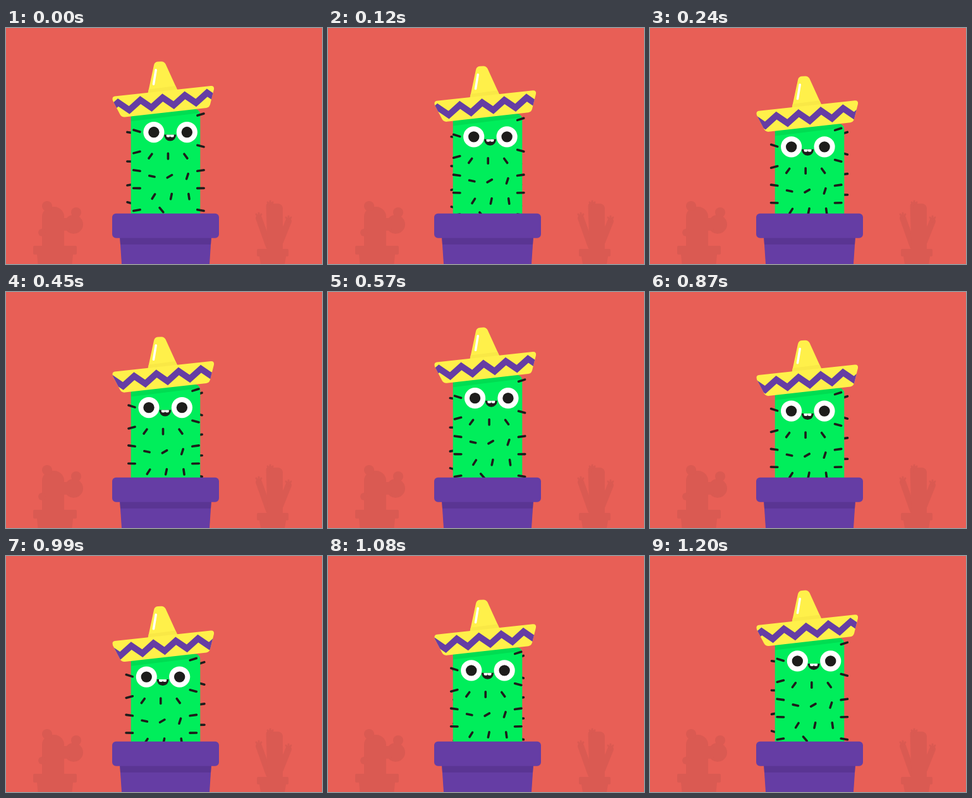
Animation, 500 px wide and 375 px high, one loop 1230 ms. Source, as an HTML page with a canvas:

```html
<!DOCTYPE html>
<html lang="en">
<head>
<meta charset="utf-8">
<title>Dancing cactus</title>
<style>
html, body { margin: 0; width: 100%; height: 100%; overflow: hidden; background: #e85f56; }
canvas { display: block; }
</style>
</head>
<body>
<canvas id="stage" width="500" height="375"></canvas>
<script>
const ctx = document.getElementById('stage').getContext('2d');
const LOOP = 1230;
const DROP = 28;
const TURNS = [15, 322, 642, 950, 1245]; // alternating top and bottom of the bounce
const RED = '#e85f56', SHADE = '#da5a52', PURPLE = '#653da4', PLUM = '#5a3593';
const GREEN = '#00ee5b', LEAF = '#00dd52', YELLOW = '#fff04a', GOLD = '#f9e846';
const INK = '#1d1d1b', WHITE = '#ffffff';

function fill(color, path) {
  ctx.fillStyle = color;
  ctx.beginPath();
  path();
  ctx.fill();
}
const circle = (x, y, r, color) => fill(color, () => ctx.arc(x, y, r, 0, Math.PI * 2));
const box = (x, y, w, h, r, color) => fill(color, () => ctx.roundRect(x, y, w, h, r));

// Upright trapezoid centred on x
const taper = (x, top, bottom, topWidth, bottomWidth, color) => fill(color, () => {
  ctx.moveTo(x - topWidth / 2, top);
  ctx.lineTo(x + topWidth / 2, top);
  ctx.lineTo(x + bottomWidth / 2, bottom);
  ctx.lineTo(x - bottomWidth / 2, bottom);
});

// Slanted strip from (x1, y1) to (x2, y2), reaching down by depth
const strip = (x1, y1, x2, y2, depth, color) => fill(color, () => {
  ctx.moveTo(x1, y1);
  ctx.lineTo(x2, y2);
  ctx.lineTo(x2, y2 + depth);
  ctx.lineTo(x1, y1 + depth);
});

function line(x1, y1, x2, y2, width, color) {
  ctx.strokeStyle = color;
  ctx.lineWidth = width;
  ctx.lineCap = 'round';
  ctx.beginPath();
  ctx.moveTo(x1, y1);
  ctx.lineTo(x2, y2);
  ctx.stroke();
}

function shifted(dx, dy, draw) {
  ctx.save();
  ctx.translate(dx, dy);
  draw();
  ctx.restore();
}

function clipped(path, draw) {
  ctx.save();
  ctx.clip(path);
  draw();
  ctx.restore();
}

function bounce(time) {
  const t = time < TURNS[0] ? time + LOOP : time;
  const i = TURNS.findIndex((turn, k) => t < TURNS[k + 1]);
  const u = (t - TURNS[i]) / (TURNS[i + 1] - TURNS[i]);
  const eased = (1 - Math.cos(Math.PI * u)) / 2;
  return DROP * (i % 2 ? 1 - eased : eased);
}

function finger(x, y, footX, width) {
  line(x, y + 4, footX, 347, width, SHADE);
  for (const side of [-1, 0, 1]) line(x + side * 4, y - 4 + 2 * Math.abs(side), x, y + 4, 3, SHADE);
}

function backdrop() {
  ctx.fillStyle = RED;
  ctx.fillRect(0, 0, 500, 375);

  box(57, 284, 35, 66, [16, 16, 0, 0], SHADE);
  circle(65, 283, 8, SHADE);
  circle(57, 325, 6, SHADE);
  circle(107, 312, 15, SHADE);
  circle(111, 293, 8, SHADE);
  box(85, 302, 16, 20, 4, SHADE);
  box(43, 346, 69, 14, 2, SHADE);
  taper(77.5, 360, 375, 57, 54, SHADE);

  finger(400, 298, 416, 10);
  finger(418, 279, 420, 13);
  finger(447, 303, 431, 10);
  box(416, 279, 22, 72, [8, 8, 0, 0], SHADE);
  box(397, 351, 50, 12, 2, SHADE);
  taper(422, 363, 375, 42, 38, SHADE);
}

function spine(x, y, degrees, length = 10.5) {
  const angle = degrees * Math.PI / 180;
  const dx = Math.cos(angle) * length / 2, dy = Math.sin(angle) * length / 2;
  line(x - dx, y - dy, x + dx, y + dy, 3.6, INK);
}

const tilt = i => 17 * Math.cos(2.6 * i);

function frontSpines() {
  [164, 198, 227, 255, 290].forEach((y, i) => spine(207, y - 0.6, tilt(i)));
  [138, 188, 227, 255, 290].forEach((y, i) => spine(308, y - 0.6, -tilt(i)));
  [[126, 36], [192, 42], [122, 20]].forEach(([angle, fan], row) => {
    for (let col = 0; col < 3; col++) {
      spine(228.5 + 2.5 * row + 28 * col, 203.5 + 32 * row, angle - fan * col, 8.5);
    }
  });
  spine(246, 289, 50, 9);
}

function backSpines() {
  [166, 212, 249, 278].forEach((y, i) => spine(197, y, tilt(i + 2)));
  for (let i = 0; i < 5; i++) spine(297, 143.5 + 32.7 * i, -tilt(i));
}

function body() {
  const shape = new Path2D();
  shape.roundRect(197.7, 129, 109.6, 200, [0, 8, 0, 0]);
  ctx.fillStyle = GREEN;
  ctx.fill(shape);
  clipped(shape, () => strip(198, 135, 304, 122, 13, LEAF));
}

function face() {
  fill(INK, () => ctx.ellipse(259.8, 169.4, 9.5, 10, 0, 0, Math.PI));
  for (const x of [253.8, 259.8]) box(x, 169.4, 6, 4, [0, 0, 2, 2], WHITE);
  for (const x of [234, 286.4]) {
    circle(x, 165.4, 16.6, WHITE);
    circle(x, 165.4, 8.7, INK);
  }
}

function hat(slide) {
  const crown = new Path2D('M224 106 L234 59 Q235 54 240 53.4 L246 53 Q250 53 252.5 57 L272 100 Z');
  ctx.fillStyle = YELLOW;
  ctx.fill(crown);
  clipped(crown, () => strip(220, 98, 275, 91, 15, GOLD));
  line(237.2, 66.5, 233.5, 89, 3.6, WHITE);

  const brim = new Path2D('M172 108.3 L324 91.8 Q330 91.4 329 97.4 L323 121.4 Q321.5 126.2 317 126.8 ' +
    'L188 141.4 Q183 141.8 180.5 137.4 L169 115.4 Q167 109.4 172 108.3 Z');
  ctx.fillStyle = YELLOW;
  ctx.fill(brim);
  clipped(brim, () => {
    ctx.strokeStyle = PURPLE;
    ctx.lineWidth = 10;
    ctx.lineJoin = 'miter';
    ctx.lineCap = 'butt';
    ctx.beginPath();
    for (let k = -4; k <= 9; k++) {
      const x = 212.7 + k * 17.6 + slide;
      ctx.lineTo(x, 121.3 - 0.109 * (x - 212.7) + (k % 2 ? 7 : -7));
    }
    ctx.stroke();
  });
}

function pot() {
  taper(252.5, 330, 375, 145, 139, PURPLE);
  taper(252.5, 333, 344, 144.4, 143, PLUM);
  box(168, 294.8, 169, 39, 6, PURPLE);
}

function draw(time) {
  const dy = bounce(time);
  const turn = 0.44 * dy;
  backdrop();
  shifted(turn, dy, backSpines);
  shifted(0, dy, body);
  shifted(-turn, dy, () => {
    frontSpines();
    face();
  });
  shifted(0, dy, () => hat(-0.54 * dy));
  pot();
}

const start = performance.now();
function tick() {
  draw((performance.now() - start) % LOOP);
  requestAnimationFrame(tick);
}
tick();
</script>
</body>
</html>
```
